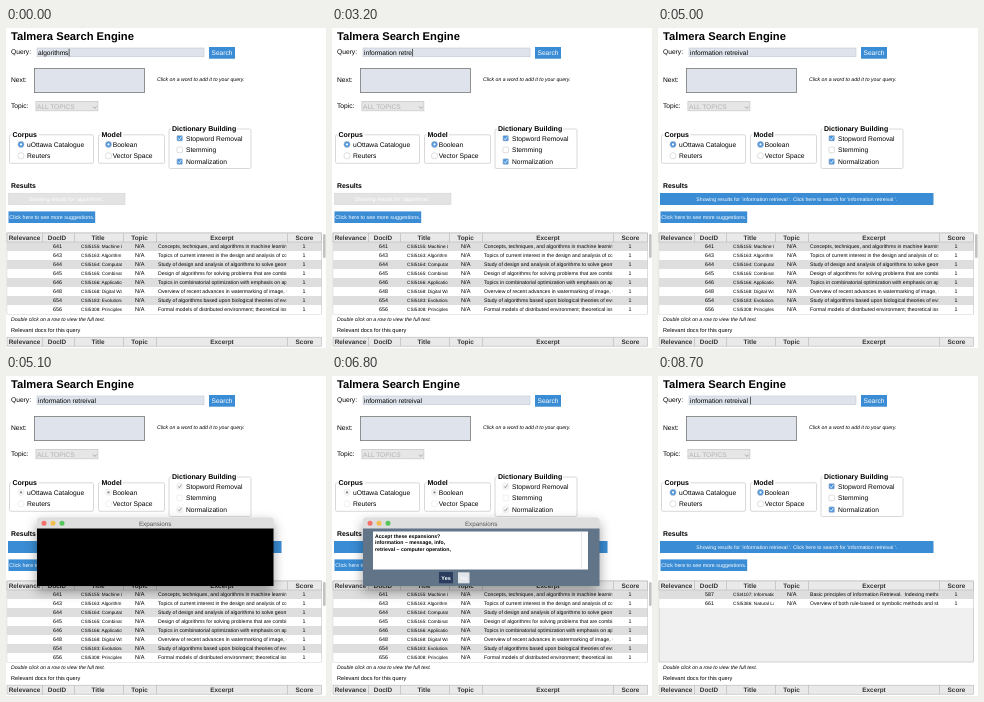
Recreate the animation shown at these times as an HTML page. Size 320 px wide and 320 px high, loop 8900 ms.

```html
<!DOCTYPE html>
<html lang="en">
<head>
<meta charset="utf-8">
<title>Talmera Search Engine</title>
<style>
  html, body { margin: 0; width: 100%; height: 100%; overflow: hidden; background: #fff; }
  svg {
    display: block; width: 100vw; height: 100vh;
    font-family: "Liberation Sans", Arial, sans-serif; text-rendering: geometricPrecision;
    --on: #4a93de; --mark: #fff; --ring: #c8c8c8;
  }
  svg.inactive { --on: #f7f7f7; --mark: #888; --ring: #e6e6e6; }
  .ring { stroke: var(--ring); stroke-width: .6; }
  .mark { fill: var(--mark); }
  .tick { fill: none; stroke: var(--mark); stroke-width: .8; }
  #dialog { filter: drop-shadow(0 5px 6px rgba(0, 0, 0, .38)); }
</style>
</head>
<body>
<svg id="stage" viewBox="0 0 320 320"></svg>
<script>
const LOOP = 8900, BLUE = '#3a8cd4';
const stage = document.getElementById('stage');
const $ = id => document.getElementById(id);

const rect = (x, y, w, h, fill, more = '') =>
  `<rect x="${x}" y="${y}" width="${w}" height="${h}" fill="${fill}" ${more}/>`;
const text = (s, x, y, size = 6.7, more = '') =>
  `<text x="${x}" y="${y}" font-size="${size}" ${more}>${s}</text>`;
const bold = 'font-weight="bold"', italic = 'font-style="italic"', mid = 'text-anchor="middle"';
const white = 'fill="#fff"';
const group = (id, body) => `<g id="${id}">${body}</g>`;

const button = (s, x, y, w, h, size) =>
  rect(x, y, w, h, BLUE) + text(s, x + w / 2, y + h / 2 + size * .36, size, `${mid} ${white}`);

const fieldset = (s, x, y, w, h, labelW) =>
  rect(x + .5, y + .5, w, h, 'none', 'rx="1.5" stroke="#cfcfcf" stroke-width=".8"') +
  rect(x + 2.5, y - 2, labelW + 2, 5, '#fff') + text(s, x + 3.5, y + 2.8, 7, bold);

const radio = (s, x, y, gap, on) =>
  `<circle class="ring" cx="${x}" cy="${y}" r="3.1" style="fill:${on ? 'var(--on)' : '#fff'}"/>` +
  (on ? `<circle class="mark" cx="${x}" cy="${y}" r="1.1"/>` : '') +
  text(s, x + gap, y + 2.3);

const check = (s, y, on) =>
  rect(170.9, y - 2.8, 5.6, 5.6, '#fff', `class="ring" rx="1" style="fill:${on ? 'var(--on)' : '#fff'}"`) +
  (on ? `<path class="tick" d="M172.2 ${y}l1.2 1.5 2-3.2"/>` : '') +
  text(s, 180, y + 2.3);

const COLUMNS = [['Relevance', 18.5], ['DocID', 51], ['Title', 92], ['Topic', 133.5], ['Excerpt', 216], ['Score', 298.5]];
const header = y =>
  rect(1, y, 314.5, 9, '#e9e9e9', 'stroke="#b5b5b5" stroke-width=".6"') +
  [36, 68, 117, 150, 281].map(x => rect(x, y, .6, 9, '#b5b5b5')).join('') +
  COLUMNS.map(([s, x]) => text(s, x, y + 6.9, 6.4, `${bold} ${mid} fill="#333"`)).join('');

const rows = list => list.map(([doc, title, excerpt], i) => {
  const y = 214 + 9 * i, base = y + 6.1;
  return rect(1.3, y, 314, 9, i % 2 ? '#fff' : '#dedede') +
    text(doc, 51.5, base, 5.3, mid) +
    text(title, 75, base, 4.7, 'clip-path="url(#titles)"') +
    text('N/A', 133.7, base, 5.6, mid) +
    text(excerpt, 152, base, 5.15, 'clip-path="url(#excerpts)"') +
    text('1', 298, base, 5.3, mid);
}).join('');

const before = [
  [641, 'CSI5155: Machine Le', 'Concepts, techniques, and algorithms in machine learning'],
  [643, 'CSI5163: Algorithm A', 'Topics of current interest in the design and analysis of comp'],
  [644, 'CSI5164: Computatio', 'Study of design and analysis of algorithms to solve geometric'],
  [645, 'CSI5165: Combinator', 'Design of algorithms for solving problems that are combinat'],
  [646, 'CSI5166: Application', 'Topics in combinatorial optimization with emphasis on appl'],
  [648, 'CSI5168: Digital Wat', 'Overview of recent advances in watermarking of image, vid'],
  [654, 'CSI5183: Evolutionar', 'Study of algorithms based upon biological theories of evolu'],
  [656, 'CSI5308: Principles o', 'Formal models of distributed environment; theoretical issues']
];
const after = [
  [587, 'CSI4107: Information', 'Basic principles of Information Retrieval.&#160; Indexing methods'],
  [661, 'CSI5386: Natural Lan', 'Overview of both rule-based or symbolic methods and stati']
];

const light = (x, fill) => `<circle cx="${x}" cy="147.2" r="2.5" fill="${fill}"/>`;

stage.innerHTML = `
  <defs>
    <clipPath id="titles">${rect(68, 205, 47.8, 82, '#000')}</clipPath>
    <clipPath id="excerpts">${rect(150, 205, 130.3, 82, '#000')}</clipPath>
  </defs>` +
  rect(0, 0, 320, 320, '#fff') +
  text('Talmera Search Engine', 5, 12, 11.2, bold) +

  text('Query:', 5, 26) +
  rect(31, 20, 167, 8.8, '#dfe4ec', 'stroke="#b9c0c9" stroke-width=".5"') +
  rect(32, 20.2, 0, 8.6, '#a9cdf4', 'id="selection"') +
  text('', 32, 26.9, 6.6, 'id="query"') +
  rect(32, 20.8, .7, 7.6, '#222', 'id="caret"') +
  button('Search', 203, 19, 26, 11.7, 6.6) +

  text('Next:', 5, 54) +
  rect(28.4, 40.4, 110, 24.2, '#dfe4ec', 'stroke="#777" stroke-width=".8"') +
  text('Click on a word to add it to your query.', 151, 53.2, 5.15, italic) +

  text('Topic:', 5, 80) +
  rect(29.9, 73.4, 62, 9.4, '#e6e6e6', 'stroke="#c6c6c6" stroke-width=".7"') +
  text('ALL TOPICS', 31, 80.7, 6.6, 'fill="#b2b2b2"') +
  '<path d="M87 78.500l1.800 2 1.800-2" fill="none" stroke="#999" stroke-width=".8"/>' +

  fieldset('Corpus', 3, 106.3, 84, 28.5, 25) +
  radio('uOttawa Catalogue', 15, 116.4, 6, true) + radio('Reuters', 15, 127.8, 6) +
  fieldset('Model', 92, 106.3, 66, 28.5, 20.5) +
  radio('Boolean', 102.5, 116.4, 4.2, true) + radio('Vector Space', 102.5, 127.8, 4.2) +
  fieldset('Dictionary Building', 162.5, 100.5, 82, 39.5, 64) +
  check('Stopword Removal', 110.3, true) + check('Stemming', 121.9) + check('Normalization', 133.6, true) +

  text('Results', 5, 160, 6.9, bold) +
  group('oldBar', rect(2.5, 165.2, 116.5, 11.5, '#e3e3e3', 'stroke="#d2d2d2" stroke-width=".5"') +
    text("Showing results for 'algorithms'.", 60.5, 173, 5.35, `${mid} ${white}`)) +
  group('newBar', button("Showing results for 'information retrieval '. Click here to search for 'information retreival '.",
    2, 165, 273.5, 12, 5.15)) +
  button('Click here to see more suggestions.', 2.5, 183.4, 86.7, 11.6, 5.35) +

  rect(1, 205, 314.5, 81, '#f0f0f0', 'stroke="#b5b5b5" stroke-width=".6"') +
  group('oldRows', rows(before) + rect(317, 206, 2.6, 24, '#c2c2c2', 'rx="1.3"')) +
  group('newRows', rows(after)) +
  header(205) +
  text('Double click on a row to view the full text.', 5, 293, 5.15, italic) +
  text('Relevant docs for this query', 5, 303.6, 5.6) +
  header(309.2) +

  group('dialog',
    '<path d="M31 153v-8.500q0-3 3-3h230.500q3 0 3 3v8.500z" fill="#dedede"/>' +
    light(38, '#f4716b') + light(47, '#f4bf50') + light(56, '#55c65c') +
    text('Expansions', 149.2, 149.7, 6.3, `${mid} fill="#555"`) +
    rect(31, 152.5, 236.5, 57.5, '#000', 'id="body"') +
    group('content',
      rect(41, 155.5, 215, 38, '#fff') + rect(249, 155.5, .6, 38, '#d5d8de') +
      ['Accept these expansions?', 'information – message, info,', 'retrieval – computer operation,']
        .map((s, i) => text(s, 43, 161.7 + 6.6 * i, 5.18, bold)).join('') +
      rect(107, 196, 14, 11.3, '#2b3d5f') + text('Yes', 114, 203.7, 5.4, `${bold} ${mid} ${white}`) +
      rect(126, 196.3, 11.5, 11, '#e2e6eb') + text('No', 131.7, 203.7, 5.4, `${mid} ${white}`)));

// One time per typed letter
const TYPED = 'information retreival ';
const KEYS = [900, 1000, 1100, 1300, 1500, 1800, 1900, 2000, 2100, 2300, 2400,
  2500, 2600, 2700, 2900, 3000, 3200, 3300, 3400, 3600, 3700, 4200];
const CARET_OFF = [[4500, 4800], [5000, 6900], [7500, 7900], [8400, 8700]];
const query = $('query'), between = (t, a, b) => t >= a && t < b;
const show = (id, on) => { $(id).style.display = on ? '' : 'none'; };

function draw(now) {
  const t = now % LOOP;
  const s = t < KEYS[0] ? 'algorithms' : TYPED.slice(0, KEYS.filter(k => k <= t).length);
  const shown = s.replace(/ /g, '\u00a0');
  if (query.textContent !== shown) query.textContent = shown;
  const width = query.getComputedTextLength();

  // The old word is selected from its end to its start
  const picked = between(t, 400, 900) ? Math.min(1, Math.floor((t - 300) / 100) / 3) : 0;
  $('selection').setAttribute('x', 32 + width * (1 - picked));
  $('selection').setAttribute('width', width * picked);
  $('caret').setAttribute('x', 32.3 + width);
  show('caret', !picked && !CARET_OFF.some(([a, b]) => between(t, a, b)));

  const asked = t >= 5000, done = t >= 6900;
  show('oldBar', !asked);
  show('newBar', asked);
  show('oldRows', !done);
  show('newRows', done);
  show('dialog', between(t, 5100, 6900));
  show('content', t >= 5200);
  $('body').setAttribute('fill', t < 5200 ? '#000' : '#627488');
  stage.classList.toggle('inactive', between(t, 5100, 6900));
}

const start = performance.now();
function tick() {
  draw(performance.now() - start);
  requestAnimationFrame(tick);
}
tick();
</script>
</body>
</html>
```
